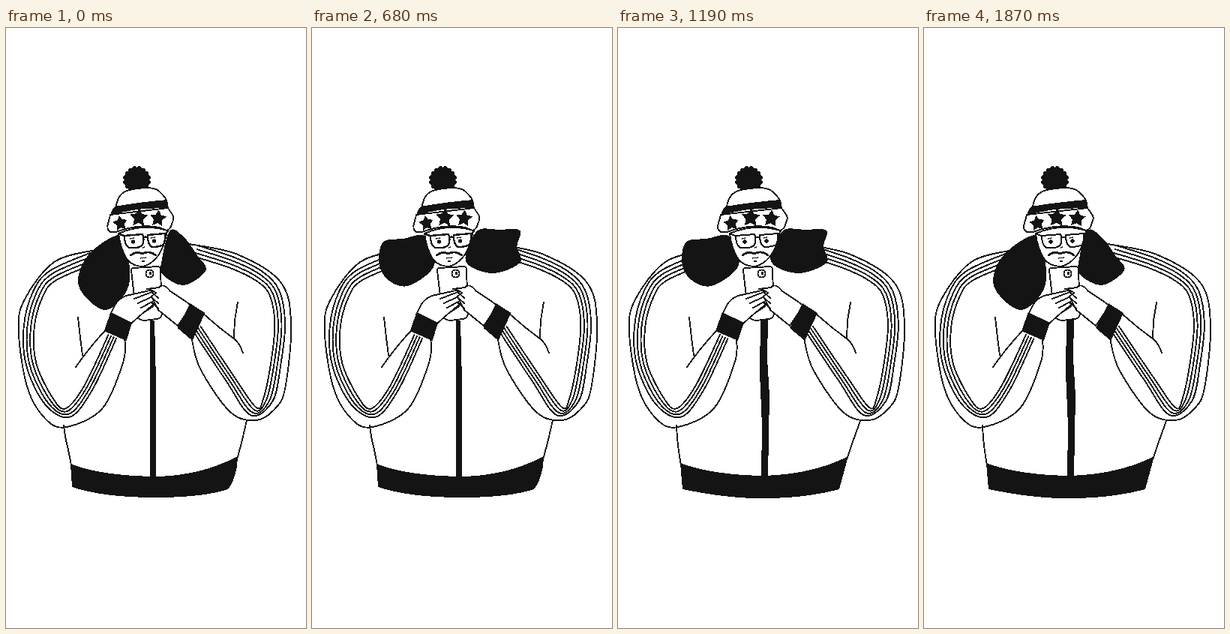
Write an HTML page that moves like this. It is 400x800 px and loops after 2040 ms.

```html
<!DOCTYPE html>
<html lang="en">
<head>
<meta charset="utf-8">
<title>Winter hat</title>
<style>
html, body { margin: 0; width: 100%; height: 100%; overflow: hidden; background: #fff; }
svg { display: block; width: 100%; height: 100%; }
.line, .skin { stroke: #141414; stroke-width: 1.9; stroke-linecap: round; stroke-linejoin: round; }
.line { fill: none; }
.skin { fill: #fff; }
.ink { fill: #141414; }
</style>
</head>
<body>
<svg id="stage" viewBox="0 0 400 800" shape-rendering="crispEdges"></svg>
<script>
const FRAME = 170, COUNT = 12;
const stage = document.getElementById('stage');

const path = (cls, d, width) =>
  `<path class="${cls}" d="${d}"${width ? ` style="stroke-width:${width}"` : ''}/>`;
const dot = (cls, x, y, r) => `<circle class="${cls}" cx="${x}" cy="${y}" r="${r}"/>`;
const group = (inner, transform) => `<g transform="${transform}">${inner}</g>`;
const squeeze = (cx, k) => `translate(${cx * (1 - k)} 0) scale(${k} 1)`;
const repeat = (n, make) => Array.from({ length: n }, (_, i) => make(i)).join('');

// Smooth curve through points (Catmull-Rom as Beziers)
function spline(pts, closed) {
  const n = pts.length;
  const at = i => closed ? pts[(i + n) % n] : pts[Math.max(0, Math.min(n - 1, i))];
  let d = `M${pts[0]}`;
  for (let i = 0; i < (closed ? n : n - 1); i++) {
    const [a, b, c, e] = [at(i - 1), at(i), at(i + 1), at(i + 2)];
    const p = b.map((v, k) => v + (c[k] - a[k]) / 6);
    const q = c.map((v, k) => v - (e[k] - b[k]) / 6);
    d += `C${p} ${q} ${c}`;
  }
  return d;
}

// Moves every point sideways; the gap narrows toward the cuff
function offset(pts, dist) {
  const last = pts.length - 1;
  return pts.map(([x, y], i) => {
    const a = pts[Math.max(0, i - 1)], b = pts[Math.min(last, i + 1)];
    const dx = b[0] - a[0], dy = b[1] - a[1];
    const r = dist * (1 - 0.25 * i / last) / Math.hypot(dx, dy);
    return [x - dy * r, y + dx * r];
  });
}

function polar(cx, cy, n, radius, tilt = 0) {
  const pts = Array.from({ length: n }, (_, i) => {
    const a = i * 2 * Math.PI / n, r = radius(i, a);
    return [cx + r * Math.sin(a + tilt), cy - r * Math.cos(a + tilt)];
  });
  return `M${pts.join('L')}Z`;
}

const star = (x, y, r, tilt) => path('ink', polar(x, y, 10, i => i % 2 ? r * 0.52 : r, tilt));
const pom = path('ink', polar(174.5, 202.5, 96, (i, a) => 16.8 + 1.8 * Math.abs(Math.sin(8 * a))));

const sleeve = (edge, stripe, side) => path('line', spline(edge)) +
  repeat(4, i => path('line', spline(offset(stripe, side * i * 5.2))));

const sleeves =
  sleeve(
    [[118, 296], [63, 312], [23, 362], [15, 405], [27, 480], [52, 522], [80, 532], [128, 507], [156, 445], [158, 414]],
    [[118, 314], [66, 336], [48, 357], [36, 400], [39, 448], [62, 495], [79, 507], [104, 476], [136, 409]], 1) +
  sleeve(
    [[245, 288], [310, 302], [368, 339], [382, 395], [374, 480], [360, 508], [335, 523], [300, 512], [260, 455], [248, 414]],
    [[252, 305], [300, 320], [335, 337], [353, 356], [360, 395], [355, 445], [345, 493], [335, 506], [304, 463], [260, 398]], -1);

const seams = path('line', 'M95 386L98 413L101 436M131 404Q111 425 92 452M310 366L306 390L305 414M265 382Q285 400 306 415Q313 421 317 433');
const cuffs = path('ink', 'M139 379L168 393L160 417L130 404ZM246 367L266 380L249 417L229 400Z');

const hat =
  path('skin', 'M145 238C147 225 154 218 164 216Q198 209 207 219Q215 226 217 233Z') +
  path('skin', 'M137 249L133 264Q133 270 137 272Q145 273 151 270Q180 261 206 266L216 270Q222 268 223 262Q227 254 225 250L218 240Z') +
  path('ink', 'M137 250Q138 242 144 238Q178 232 217 229L219 241Q176 238 137 250Z') +
  star(151, 260.5, 11, -0.15) + star(177, 253, 13, 0.05) + star(204, 254, 12, 0.1);

const face =
  path('skin', 'M149 274Q151 294 161 309Q169 318 183 318Q195 315 204 303Q213 290 216 270Q182 260 149 274Z') +
  dot('ink', 169, 285, 2.6) + dot('ink', 198, 284, 2.6) +
  path('line', 'M165 281L170 280M194 280L199 279M182 293L185 292M179 307L187 306M181 311L185 311', 1.3) +
  path('line', 'M166 303Q173 297 182 301Q191 296 200 303', 2.8);

const glasses = width => path('line',
  'M150 275L157 277L182 275Q185 282 182 289Q179 293 171 293L163 293Q157 289 157 277' +
  'M189 276L213 274Q214 283 211 289Q205 292 195 292Q189 289 189 276M183 280Q186 277 189 280M213 276L217 271', width);

const phone =
  path('skin', 'M167 323Q167 320 170 320L203 318Q206 319 206 322L208 382Q207 387 201 388L184 390Q176 389 174 384Z') +
  dot('line', 191.5, 327.5, 5) + dot('ink', 192.5, 327, 2);

const hands =
  path('skin', 'M139 382L146 368Q152 360 160 357L187 351Q195 349 196 353L199 361Q199 366 195 370L178 384L166 395Z') +
  path('skin', 'M188 348L204 346Q210 339 219 351L236 362L247 370L229 397L203 376L194 358L200 353Q195 349 188 348Z') +
  repeat(4, i => path('line', `M${171 + 4.5 * i} ${361 + 6 * i}L${192 + 1.5 * i} ${353 + 6 * i}`)) +
  repeat(3, i => path('line', `M194 ${352 + 7 * i}L203 ${360 + 7 * i}`));

const blobs = (...list) => list.map(pts => path('ink', spline(pts, true))).join('');
const flapsDown = blobs(
  [[150, 276], [106, 303], [93, 344], [128, 376], [159, 350], [162, 313]],
  [[218, 270], [238, 280], [255, 303], [267, 323], [237, 343], [208, 329], [206, 313]]);
const flapsUp = blobs(
  [[149, 278], [118, 281], [90, 286], [86, 318], [102, 339], [128, 343], [161, 316]],
  [[219, 271], [250, 269], [278, 270], [274, 291], [278, 313], [240, 327], [204, 311]]);

const poses = [
  {
    sides: 'M77 530Q79 548 83 562L87 583M321 523Q316 546 309 572',
    hem: 'M86 581Q125 597 200 598Q260 597 309 571L308 585Q304 605 296 615Q262 626 200 626Q130 626 88 612Z',
    zip: 'M191.5 390L198 390L200 470L200 598L191.5 598Z',
    arms: 0.99, flaps: 0.975, hat: 0.95, face: 0.965, lens: 2.4
  },
  {
    sides: 'M78 530Q79 556 84 583M323 524Q314 548 306 573',
    hem: 'M83 580Q125 596 195 597Q260 595 307 571L295 615Q250 627 195 627Q150 628 86 615Z',
    zip: 'M190 390L200 388L199 440L202 490L200 597L191 597L192 530L189 460Z',
    arms: 1, flaps: 1, hat: 1, face: 1, lens: 2
  }
];

const draw = (p, up) =>
  path('line', p.sides) + path('ink', p.hem) + path('ink', p.zip) +
  group(sleeves + seams, squeeze(198, p.arms)) +
  group(up ? flapsUp : flapsDown, squeeze(250, p.flaps)) +
  group(face + glasses(p.lens), squeeze(183, p.face)) +
  pom + group(hat, squeeze(179, p.hat)) + phone + hands +
  group(cuffs, squeeze(198, p.arms));

let shown = -1;
function tick() {
  const step = Math.floor(performance.now() / FRAME) % COUNT;
  if (step !== shown) {
    shown = step;
    stage.innerHTML = draw(poses[step % 2], step >= 4 && step < 8);
  }
  requestAnimationFrame(tick);
}
tick();
</script>
</body>
</html>
```
